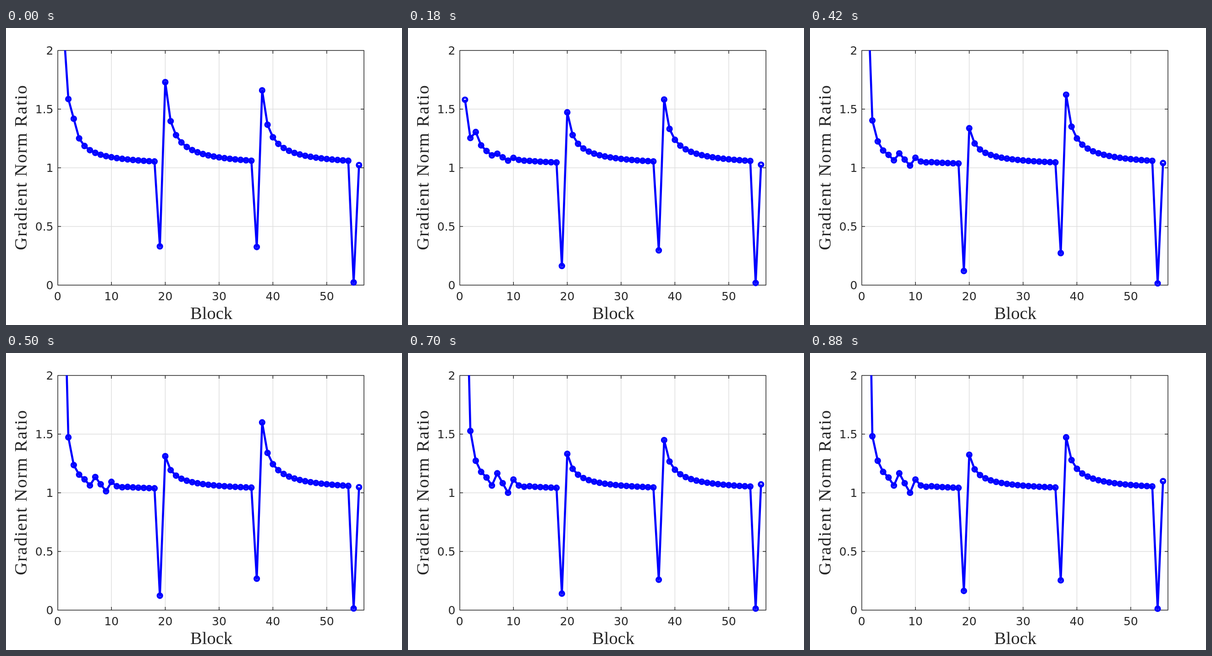
Write an HTML page with a canvas that moves like this. It is 864 px wide and 648 px high and loops after 900 ms.

```html
<!DOCTYPE html>
<html lang="en">
<head>
<meta charset="utf-8">
<title>Gradient Norm Ratio</title>
<style>
  html, body { margin: 0; overflow: hidden; background: #fff; }
  canvas { display: block; }
</style>
</head>
<body>
<canvas width="864" height="648"></canvas>
<script>
const ctx = document.querySelector('canvas').getContext('2d');
const LOOP = 900, STEP = 20;
const LEFT = 113, RIGHT = 781, TOP = 49, BOTTOM = 561;
const INK = '#262626', GRID = '#dfdfdf', BLUE = '#0000ff';
const blockX = n => 112.6 + 11.744 * n;
const valueY = v => BOTTOM - 256 * v;

// Ratios of the leading blocks at a few key times
const times = [0, 180, 320, 500, 600, 700, 880];
const peaks = {
  1: [2.27, 1.58, 1.78, 3.25, 3.28, 3.39, 4.14],
  2: [1.586, 1.254, 1.293, 1.473, 1.48, 1.527, 1.482],
  3: [1.418, 1.305, 1.215, 1.236, 1.244, 1.273, 1.273],
  20: [1.73, 1.473, 1.383, 1.312, 1.297, 1.332, 1.324],
  38: [1.66, 1.582, 1.637, 1.6, 1.541, 1.449, 1.473]
};

// Monotone cubic through the key values
function sample(keys, t) {
  const last = times.length - 2;
  let i = 0;
  while (i < last && t >= times[i + 1]) i++;
  const slope = k => (keys[k + 1] - keys[k]) / (times[k + 1] - times[k]);
  const tangent = k => {
    if (k === 0) return slope(0);
    if (k > last) return slope(last);
    const a = slope(k - 1), b = slope(k);
    return a * b > 0 ? 2 * a * b / (a + b) : 0;
  };
  const span = times[i + 1] - times[i];
  const u = (t - times[i]) / span, v = 1 - u;
  return v * v * (1 + 2 * u) * keys[i] + u * u * (3 - 2 * u) * keys[i + 1]
    + span * u * v * (v * tangent(i) - u * tangent(i + 1));
}

// Period-three ripple around block 8 that grows over the loop
function ripple(n, t) {
  const envelope = Math.exp(-(((n - 8) / 2.5) ** 2));
  return -.1 * Math.min(1, t / 700) * envelope * Math.sin((n - 8) * 2 * Math.PI / 3);
}

function ratios(t) {
  const values = [];
  for (const n in peaks) values[n] = sample(peaks[n], t);

  // Each stage falls towards 1 by a power law, steeper after a higher peak
  for (const [first, end] of [[3, 18], [20, 36], [38, 54]]) {
    const height = values[first] - 1;
    const power = .55 + .45 * height;
    for (let n = first + 1; n <= end; n++) {
      values[n] = 1 + height * (n - first + 1) ** -power + ripple(n, t);
    }
  }

  values[19] = .035 + .295 * Math.exp(-t / 170) + .13 * t / LOOP;
  values[37] = .245 + .08 * Math.exp(-t / 400);
  values[55] = .011 + .012 * Math.exp(-t / 350);
  values[56] = 1.023 + .08 * (t / LOOP) ** 2;
  return values;
}

function line(x1, y1, x2, y2, color) {
  ctx.strokeStyle = color;
  ctx.beginPath();
  ctx.moveTo(x1, y1);
  ctx.lineTo(x2, y2);
  ctx.stroke();
}

function label(text, x, y, align) {
  ctx.textAlign = align;
  ctx.fillText(text, x, y);
}

function drawAxes() {
  ctx.lineWidth = 1.5;
  ctx.fillStyle = INK;
  ctx.font = '25px "DejaVu Sans", sans-serif';
  for (let n = 0; n <= 50; n += 10) {
    const x = blockX(n);
    if (n) {
      line(x, TOP, x, BOTTOM, GRID);
      line(x, TOP, x, TOP + 7, INK);
      line(x, BOTTOM, x, BOTTOM - 7, INK);
    }
    label(n, x, 594, 'center');
  }
  for (let v = 0; v <= 2; v += .5) {
    const y = valueY(v);
    if (v % 2) {
      line(LEFT, y, RIGHT, y, GRID);
      line(LEFT, y, LEFT + 7, y, INK);
      line(RIGHT, y, RIGHT - 7, y, INK);
    }
    label(v, 103.5, y + 9, 'right');
  }
  ctx.strokeRect(LEFT, TOP, RIGHT - LEFT, BOTTOM - TOP);

  ctx.font = '38.5px "Liberation Serif", serif';
  label('Block', 448, 635, 'center');
  ctx.save();
  ctx.translate(45, 304);
  ctx.rotate(-Math.PI / 2);
  ctx.letterSpacing = '1.8px';
  label('Gradient Norm Ratio', 0, 0, 'center');
  ctx.restore();
}

function drawCurve(values) {
  ctx.strokeStyle = BLUE;
  ctx.lineWidth = 4.6;
  ctx.lineJoin = 'round';
  ctx.save();
  ctx.beginPath();
  ctx.rect(LEFT, TOP - .5, RIGHT - LEFT, BOTTOM - TOP + 1);
  ctx.clip();
  ctx.beginPath();
  values.forEach((v, n) => ctx.lineTo(blockX(n), valueY(v)));
  ctx.stroke();
  ctx.restore();
  values.forEach((v, n) => {
    if (v > 2) return;
    ctx.beginPath();
    ctx.arc(blockX(n), valueY(v), 4.8, 0, 2 * Math.PI);
    ctx.stroke();
  });
}

function draw() {
  const t = Math.floor(performance.now() % LOOP / STEP) * STEP;
  ctx.fillStyle = '#fff';
  ctx.fillRect(0, 0, 864, 648);
  drawAxes();
  drawCurve(ratios(t));
  requestAnimationFrame(draw);
}
draw();
</script>
</body>
</html>
```
